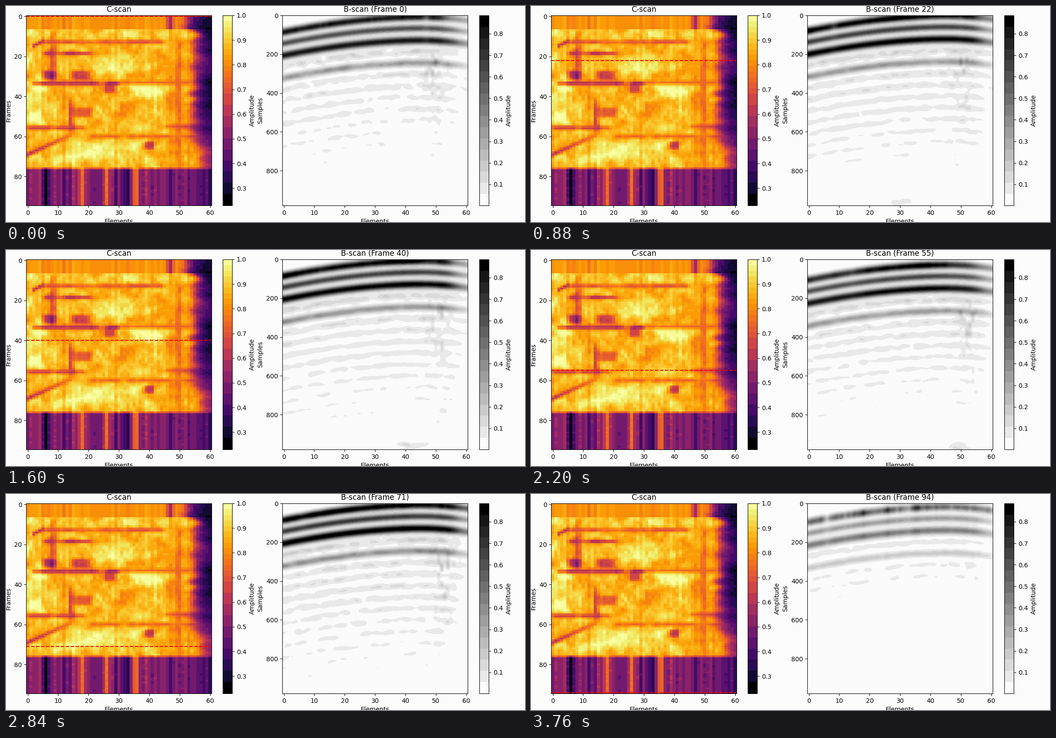
Write a matplotlib script that moves like this. It is 1159 px wide and 483 px high and loops after 3.8 s.

```python
import numpy as np
import matplotlib.pyplot as plt
from matplotlib.animation import FuncAnimation
from matplotlib.colors import ListedColormap

W, H, DPI = 1159, 483, 100
FRAMES, ELEMS, SAMPLES = 95, 61, 980
STILL = 77  # from this row on the probe stands still
PAPER = "#fcfcfc"

rng = np.random.default_rng(12)
col = np.arange(ELEMS)[None, :]
row = np.arange(FRAMES)[:, None]
depth = np.arange(SAMPLES)[:, None]


def smooth(a, width, axis):
    """Hann average over an odd number of cells."""
    kernel = np.hanning(width + 2)[1:-1]
    pad = [(0, 0)] * a.ndim
    pad[axis] = (width // 2, width // 2)
    a = np.pad(a, pad, mode="edge")
    return np.apply_along_axis(np.convolve, axis, a, kernel / kernel.sum(), "valid")


def noise(shape, widths):
    a = rng.standard_normal(shape)
    for axis, width in enumerate(widths):
        if width > 1:
            a = smooth(a, width, axis)
    return a / a.std()


def sigmoid(x):
    return 1 / (1 + np.exp(-np.clip(x, -40, 40)))


def bump(x, width):
    return np.exp(-0.5 * (x / width) ** 2)


def plateau(x, half):
    return np.exp(-(x / half) ** 4)


# ---------- C-scan ----------

# column, row, half width, half height, change of level
BLOBS = [
    (26, 9, 30, 2.6, 0.04), (28, 24, 6.5, 5, 0.09), (23, 66.5, 14, 5.5, 0.08),
    (2, 44, 5, 11, 0.06), (40, 37.5, 7.5, 3.5, 0.08),
    (8.3, 20, 1.1, 13, -0.17), (7, 29.5, 2.2, 2.3, -0.25), (17.5, 29.5, 3.2, 2.4, -0.26),
    (27, 36, 2, 2.6, -0.24), (14.3, 50, 0.9, 8, -0.18), (18, 48, 3, 2.5, -0.22),
    (40, 64.5, 1.9, 2, -0.27), (49.5, 45, 1.2, 32, -0.09),
]
# row, first column, last column, level
SEAMS = [(12.7, 6, 44, 0.68), (18.5, 6, 21, 0.56), (33.4, 2, 30, 0.54),
         (33, 31, 53, 0.74), (55.7, 0, 18, 0.62), (55, 46, 56, 0.70), (60, 21, 55, 0.73)]


def stripes(grain):
    level = 0.49 + 0.05 * grain - 0.18 * sigmoid((col - 55) / 1.8)
    for c, width, change in ((18, 0.6, 0.26), (26, 0.8, 0.28), (35.5, 0.9, 0.28),
                             (32.5, 0.8, -0.10), (6, 0.4, -0.30)):
        level = level + change * bump(col - c, width)
    return level


def make_cscan():
    fine = noise((1, ELEMS), (1, 1))
    a = 0.87 + 0.015 * fine + 0.028 * noise((FRAMES, ELEMS), (7, 5))
    a += 0.015 * noise((FRAMES, ELEMS), (3, 1))

    for c, r, half_w, half_h, change in BLOBS:
        a += change * plateau(col - c, half_w) * plateau(row - r, half_h)
    for r, c0, c1, level in SEAMS:
        ragged = np.clip(0.85 + 0.2 * noise((1, ELEMS), (1, 5)), 0, 1)
        reach = sigmoid((col - c0 + 0.5) / 0.4) * sigmoid((c1 + 0.5 - col) / 0.4)
        a += (level - a) * bump(row - r, 0.75) * reach * ragged
    rise = bump(row - (69 - 0.68 * col), 0.85) * (col < 15)
    hook = bump(row - (16 - 0.7 * col), 0.7) * (col > 1) * (col < 6)
    a += (0.60 + 0.012 * col - a) * rise + (0.6 - a) * hook

    a[:7] = 0.815 + 0.022 * fine - 0.2 * bump(col - 46.8, 0.8)

    # ragged loss of signal at the right
    edge = 54.3 + 2.4 * bump(row - 9, 1.5) + 3.2 * bump(row - 70, 6)
    edge = edge + 0.5 * noise((FRAMES, 1), (5, 1)) - 2 * (row < 7)
    low = 0.42 + 0.035 * noise((FRAMES, 1), (9, 1)) + 0.15 * bump(row - 70, 7)
    low = low - 0.02 * np.clip(col - edge - 1, 0, 6)
    a += (low - a) * sigmoid((col - edge) / 0.9)

    a[STILL:] = stripes(fine) + 0.005 * rng.standard_normal((FRAMES - STILL, ELEMS))
    a[STILL - 1] = (a[STILL - 2] + a[STILL]) / 2 + 0.04
    return np.clip(a, 0.23, 1)


cscan = make_cscan()

# ---------- B-scan ----------

away = (45 - col) / 45
surface = 8 + np.where(col < 45, 78 * np.abs(away) ** 1.8, 160 * away ** 2)
grain = noise((13, SAMPLES, ELEMS), (1, 45, 3))
streaks = noise((13, SAMPLES, ELEMS), (1, 61, 1))

gains = 1.1 * smooth(cscan[:, 8:46].mean(axis=1), 3, 0) ** 1.2
gains[STILL:] *= np.linspace(1.3, 0.95, FRAMES - STILL)


def at_frame(keys, n):
    t = np.clip(n - 6, 0, 70) / 6
    i = int(t)
    return keys[i] * (1 - t + i) + keys[i + 1] * (t - i)


def bscan(n):
    shift = -7 * bump(n - 22, 8) + 20 * bump(n - 55, 3.5) + 10 * sigmoid(n - 76)
    s = depth - surface - shift
    g = at_frame(grain, n)
    tone, gain = cscan[n][None, :], gains[n]

    # four clear echoes; the first one carries the C-scan amplitude
    side = 1 - 0.5 * sigmoid((col - 57) / 1.2)
    deep = gain * side * (0.7 + 0.3 * tone / tone.mean())
    img = tone * bump(s, 14) + deep * (
        0.68 * bump(s - 58, 13) + 0.92 * bump(s - 120, 14.5) + 0.24 * bump(s - 237, 13))

    # weak repeats that die away with depth
    ratio = gain / 0.87
    fade = ratio ** (0.8 + np.clip((s - 380) / 100, 0, 1.2))
    ripple = 0.64 + 0.36 * np.cos(2 * np.pi * (s - 355) / 59)
    halo = 0.125 * np.exp(-np.clip(s - 180, 0, None) / 480) * sigmoid((s - 145) / 8)
    img = img + halo * ripple * fade * side * (1 + 0.25 * g)

    # scattered echoes near the last elements
    blots = np.clip(at_frame(streaks, n) + 0.2, 0, 2) * bump(col - 49.5 - 0.05 * min(n, 70), 2.4)
    reach = sigmoid((s - 200) / 15) * np.exp(-np.clip(s - 237, 0, None) / 260)
    img = img + 0.095 * ratio ** 2 * blots * reach

    # faint trace at the bottom, drifting right
    tail = bump(col - 33 - 0.47 * (n - 22), 4.5) * bump(depth - 958, 16)
    return img + 0.055 * tail * (0.85 + 0.5 * g) * plateau(n - 42, 30)


# ---------- figure ----------

def banded(name, low, high, split):
    """Colour map in flat bands: low per unit below the split, high above."""
    u = np.linspace(0, 1, 512)
    steps = np.where(u < split, low, high)
    mid = (np.floor(u * steps) + 0.5) / steps
    mid[u < 1 / low] = 0
    return plt.get_cmap(name)(mid)


heat = ListedColormap(banded("inferno", 17, 34, 10 / 17))
ink_shades = banded("gray_r", 17, 17, 1)
ink_shades[-30:, :3] = 0
ink = ListedColormap(np.minimum(ink_shades, [0.988, 0.988, 0.988, 1]))

fig = plt.figure(figsize=(W / DPI, H / DPI), dpi=DPI, facecolor=PAPER)


def panel(x, width):
    return fig.add_axes([x / W, 37 / H, width / W, 425 / H], facecolor=PAPER)


def scan(x, data, title, ylabel, **kw):
    ax = panel(x, 414)
    im = ax.imshow(data, aspect="auto", **kw)
    ax.set_xlabel("Elements")
    ax.set_ylabel(ylabel)
    return ax, im, ax.set_title(title)


def bar(x, im):
    fig.colorbar(im, cax=panel(x, 21.2), label="Amplitude")


ax_c, im_c, _ = scan(45.2, cscan, "C-scan", "Frames", cmap=heat,
                     vmin=0.23, vmax=1, interpolation="nearest")
cursor = ax_c.axhline(0, color="red", ls="--")
ax_b, im_b, title = scan(617.2, bscan(0), "B-scan (Frame 0)", "Samples", cmap=ink,
                         vmin=0.002, vmax=0.885, interpolation="bilinear")
bar(484, im_c)
bar(1057, im_b)


def update(n):
    cursor.set_ydata([n, n])
    im_b.set_data(bscan(n))
    title.set_text(f"B-scan (Frame {n})")
    return cursor, im_b, title


anim = FuncAnimation(fig, update, frames=FRAMES, interval=40, repeat=True, repeat_delay=0)
plt.show()
```
